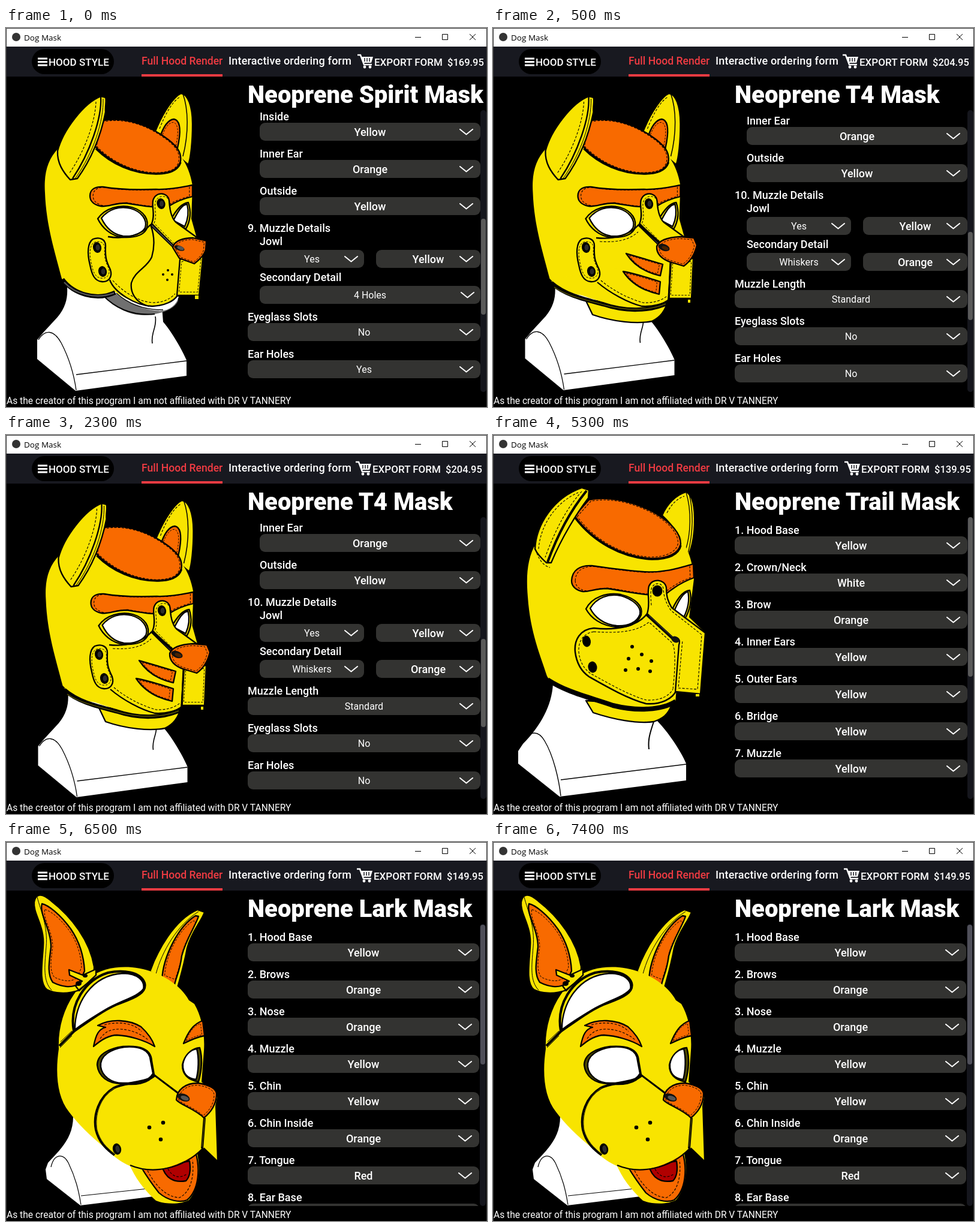
Animation of 802x632 px, one loop 8 s. Source, as an HTML page:

```html
<!DOCTYPE html>
<html lang="en">
<head>
<meta charset="utf-8">
<title>Hood order form</title>
<style>
  html, body { margin: 0; width: 100%; height: 100%; overflow: hidden; background: #000; }
  svg { display: block; width: 802px; height: 632px; }
  text { font: 500 18px Roboto, sans-serif; fill: #fff; }
  .title { font-weight: 800; font-size: 40px; }
  .value { text-anchor: middle; }
  .small { font-size: 16px; font-weight: 400; }
  .bar { font-size: 17px; }
  .line, .stitch, .chevron { fill: none; stroke: #000; stroke-width: 2; stroke-linejoin: round; }
  .chevron { stroke: #fff; stroke-linecap: round; }
  .stitch { stroke-width: 1.1; stroke-dasharray: 4 2.5; }
  .inset { transform-box: fill-box; transform-origin: center; }
</style>
</head>
<body>
<svg viewBox="0 0 802 632">
  <defs><clipPath id="list"><rect x="400" y="137" width="402" height="470"/></clipPath></defs>
  <rect width="802" height="632"/>
  <rect width="802" height="31" fill="#fff"/>
  <circle cx="17" cy="15" r="7" fill="#333"/>
  <text x="30" y="21" style="font:13.5px 'Open Sans',sans-serif;fill:#000">Dog Mask</text>
  <path d="M682 15.5h10M727.5 10.5h9v9h-9zM773 10l10 10m0-10l-10 10" fill="none" stroke="#000"/>
  <rect y="31" width="802" height="50" fill="#181920"/>
  <rect x="43" y="35" width="137" height="42" rx="21"/>
  <path d="M53 51h16M53 56.5h16M53 62h16" stroke="#fff" stroke-width="3"/>
  <text class="bar" x="71" y="63">HOOD STYLE</text>
  <text x="226" y="61" style="fill:#ef3b42;font-size:17.6px">Full Hood Render</text>
  <rect x="226" y="77" width="135" height="4" fill="#ef3b42"/>
  <text x="371" y="61" letter-spacing=".2">Interactive ordering form</text>
  <text x="1" y="627" style="font-size:15.6px;font-weight:400">As the creator of this program I am not affiliated with DR V TANNERY</text>
  <g id="stage"></g>
  <path d="M.5 632V.5h801V632" fill="none" stroke="#333"/>
</svg>
<script>
const YELLOW = '#f8e400', ORANGE = '#f86a00', WHITE = '#fff', GRAY = '#707070';

// Drawing helpers
const shape = (d, fill) => `<path d="${d}" fill="${fill}"/>`;
const line = (d, width = 2.3, color = '#000') =>
  `<path class="line" d="${d}" style="stroke:${color};stroke-width:${width}"/>`;
const stitch = d => `<path class="stitch" d="${d}"/>`;
const patch = (d, fill, inset) => shape(d, fill) + line(d) +
  (inset ? `<path class="stitch inset" d="${d}" transform="scale(${inset})"/>` : '');
const oval = (x, y, rx, ry = rx, fill = '#000', turn = 0) =>
  `<ellipse cx="${x}" cy="${y}" rx="${rx}" ry="${ry}" fill="${fill}" transform="rotate(${turn} ${x} ${y})"/>`;
const snap = (x, y) => oval(x, y, 7, 9, '#000', -12) + oval(x + 1, y, 3.5, 5, '#2c2c2c');
const holes = (r, ...points) => points.map(([x, y]) => oval(x, y, r)).join('');
const text = (x, y, str, cls = '') => `<text class="${cls}" x="${x}" y="${y}">${str}</text>`;

// Form helpers
function box(x, y, right, value, small, arrow = 34) {
  const middle = (x + right) / 2;
  return `<rect x="${x}" y="${y}" width="${right - x}" height="30" rx="9" fill="#333331"/>` +
    text(middle, y + (small ? 21 : 22), value, small ? 'value small' : 'value') +
    `<path class="chevron" d="M${right - arrow} ${y + 11}l10.5 8.5l10.5-8.5"/>`;
}
const field = (x, y, label, value, small, right = 791) =>
  text(x, y - 4, label) + box(x, y, right, value, small);
const halves = (y, label, a, b) => text(423, y - 8, label) +
  box(423, y, 597, a, true, 32) + box(617, y, 791, b);
const column = (right, ...rows) =>
  rows.map(([label, value], i) => field(403, 169 + 62 * i, `${i + 1}. ${label}`, value, false, right)).join('');

const header = (x, price) => `<g transform="translate(${x} 44)">
  <path d="M0 1h5l6 16h13" fill="none" stroke="#fff" stroke-width="2.5"/>
  <path d="M6 4h20l-3 10H10z" fill="#fff"/>
  <path d="M12 6v6M16 6v6M20 6v6" stroke="#181920" stroke-width="1.5"/>
  ${oval(12, 21, 2.4, 2.4, WHITE)}${oval(21, 21, 2.4, 2.4, WHITE)}</g>` +
  text(x + 28, 63, 'EXPORT FORM', 'bar') +
  `<text x="${x + 150}" y="63" style="font-size:16.5px">${price}</text>`;

const scrollbar = (x, top, bottom, color) =>
  `<rect x="${x}" y="137" width="10" height="470" rx="5" fill="#15161d"/>
   <rect x="${x + 1}" y="${top}" width="8" height="${bottom - top}" rx="4" fill="${color}"/>`;

// Parts common to the two pointed-ear hoods
const bust =
  shape('M102 432C103 450 100 465 86 482L62 508L52 520V552L116 605L301 580V554C293 535 275 505 262 490L258 440Z', WHITE) +
  line('M54 520C65 502 80 503 92 525C105 550 113 575 117 604M117 578L301 555', 1.3) +
  line('M249 481C252 500 241 508 244 526', 1.6);
const earsAndFace =
  patch('M249 172C262 140 280 114 292 109C303 110 311 130 311 160C311 190 308 217 304 228L280 208Z', YELLOW) +
  line('M295 110C304 135 305 175 295 214', 1.5) + stitch('M256 168C266 142 278 122 290 115') +
  patch('M256 184C262 165 270 153 280 152C291 154 291 172 288 190L285 205Z', ORANGE, .8) +
  shape('M88 200C68 220 63 245 65 275C67 330 82 375 93 418C120 446 155 452 182 440C200 452 222 463 244 464C265 463 280 455 286 446L290 380L318 350L309 318L311 263C307 240 300 225 291 214L160 156Z', YELLOW) +
  patch('M158 155C190 148 227 156 262 180C286 196 293 208 291 222C289 237 275 243 250 243C210 242 172 222 148 197Z', ORANGE, .96) +
  line('M150 201C176 227 212 243 250 243C272 243 286 238 291 224', 3.5) +
  patch('M140 280C140 268 150 264 162 265C190 270 220 270 250 269C275 270 295 265 311 262V281C298 284 284 289 270 298C240 300 220 295 200 292C180 292 170 299 158 297C147 295 140 289 140 280Z', ORANGE, .94) +
  patch('M86 205C95 170 130 125 158 114L166 116C168 122 165 130 166 140C159 175 145 215 119 251L107 253C95 240 85 225 86 205Z', YELLOW) +
  line('M158 115C160 150 140 208 111 251') + line('M162 118C163 155 146 208 116 250', 1) +
  stitch('M150 123C149 155 132 205 105 243') +
  patch('M153 318C165 300 190 294 210 299C230 305 240 320 234 336C228 346 214 350 195 349C175 347 160 333 153 318Z', YELLOW) +
  patch('M159 317C171 302 190 296 208 301C226 306 236 320 232 333C225 344 212 348 195 347C178 344 166 332 159 317Z', WHITE) +
  patch('M274 321C282 306 292 292 304 291C309 306 307 322 300 335Z', YELLOW) +
  patch('M279 321C286 308 293 294 302 294C305 306 304 318 298 331Z', WHITE) +
  patch('M243 326C249 312 243 300 245 288C249 272 270 273 272 288C273 305 276 320 286 326L322 352L281 365Z', YELLOW, .9) +
  line('M241 327L282 367', 5) + line('M243 329L282 367', 1.5, '#555') +
  snap(258.5, 293);
const cheekStrap =
  patch('M145 352C156 348 166 352 166 363C165 385 168 390 174 403C178 415 171 424 160 423C147 422 143 410 140 395C135 375 136 358 145 352Z', YELLOW, .84) +
  snap(152, 366) + snap(161, 406);

const roundMuzzle = bust +
  shape('M160 442C180 465 205 480 232 479C258 477 280 470 287 455L285 440Z', GRAY) +
  shape('M180 440C205 462 232 470 258 472C274 470 284 462 288 448Z', WHITE) +
  line('M162 446C185 470 215 480 248 477', 2) + line('M184 442C208 464 235 470 262 470', 1.5) +
  earsAndFace +
  line('M94 419C112 443 150 456 182 441', 7) + line('M97 424C115 444 150 453 180 442', 2.5, '#555') +
  line('M170 348C200 353 226 345 241 328C248 347 248 365 243 382C235 400 215 405 209 425C207 440 215 458 238 464M173 420C180 440 215 463 244 464C266 463 280 455 286 446') +
  stitch('M178 421C195 440 220 456 244 458C262 458 274 452 282 443') +
  cheekStrap +
  patch('M290 386L329 375L322 446H285Z', YELLOW, .84) + shape('M315 446h6v6h-6z', YELLOW) +
  patch('M278 366C280 355 295 350 312 350L334 355L333 370C330 380 322 387 314 393L289 384Z', ORANGE, .87) +
  oval(289, 367, 9, 4, '#111', 20) + oval(291, 367, 6, 3, '#555', 20) +
  holes(2, [262, 411], [270, 404], [277, 411], [269, 420]);

const whiskerMuzzle = `<g transform="translate(1.5 -1)">${bust}</g>` +
  patch('M155 455L166 478C200 490 240 494 265 489C280 482 288 470 291 455Z', YELLOW) +
  `<g transform="translate(1.5 0)">${earsAndFace}</g>` +
  shape('M97 422C130 442 150 446 185 458C220 469 260 470 291 456L296 380L276 372L250 395L140 410Z', YELLOW) +
  line('M97 425C120 445 150 452 185 461C220 473 262 473 292 458', 7) +
  line('M102 432C125 448 155 453 190 463C225 472 262 471 288 460', 1.5, '#5c5500') +
  line('M172 350C202 353 228 345 243 328M174 424C195 442 225 458 248 464C268 465 285 460 294 452') +
  stitch('M178 356C206 358 226 354 242 340M180 421C200 438 228 452 250 458C268 459 282 454 290 447') +
  `<g transform="translate(3 0)">${cheekStrap}</g>` +
  patch('M297 388L334 384L331 451H293Z', YELLOW, .84) + shape('M325 453h4v5h-4z', YELLOW) +
  line('M296 388L293 458', 3) +
  line('M244 328L282 362', 4) +
  patch('M273 364C277 354 292 349 312 348L335 350L340 362C336 380 328 390 318 397L298 391C281 386 272 376 273 364Z', ORANGE, .87) +
  oval(285, 366, 10, 5.5, '#111', 20) + oval(287, 367, 6, 3, '#4a2200', 20) +
  patch('M222 376L283 394L279 413C255 408 235 396 222 376Z', ORANGE, .82) +
  patch('M217 406C240 410 262 418 279 423L277 444C250 438 230 426 217 406Z', ORANGE, .82);

const flatMuzzle =
  shape('M100 415C98 455 75 490 50 515L42 527V548L111 603L322 576V548C315 530 292 495 275 478L240 440Z', WHITE) +
  line('M44 521C55 494 74 489 86 510C101 535 110 575 113 602M113 575L322 549', 1.4) +
  line('M268 478C262 496 258 508 260 524', 2) +
  patch('M155 443L167 463C200 474 240 482 268 478C283 473 292 466 297 452Z', YELLOW) +
  patch('M282 134C290 115 305 100 322 95C333 100 337 120 336 150C335 172 331 190 325 202C318 180 305 155 282 134Z', YELLOW) +
  line('M322 96C331 125 330 165 321 192M327 98C335 130 333 165 325 198', 1.3) + stitch('M290 130C298 115 307 106 319 102') +
  shape('M72 180C57 205 55 235 58 270C62 330 80 370 90 402L97 414C130 430 160 437 195 450C235 460 275 459 304 446L312 345L354 330L327 304L335 240C333 210 325 190 312 170L160 108L136 130Z', YELLOW) +
  line('M91 408C125 430 160 437 200 451C240 461 282 459 305 444', 8) +
  patch('M136 135L160 108C190 102 230 108 270 130C300 148 313 165 313 182C310 198 290 206 265 206C215 204 165 175 136 135Z', ORANGE, .95) +
  line('M137 138C167 178 215 205 265 207C291 207 309 200 313 184', 3.5) +
  patch('M70 190C72 150 100 105 148 88L160 92L159 105C140 130 115 170 97 213L89 213C80 205 73 197 70 190Z', YELLOW) +
  line('M156 93C130 125 108 165 91 212', 4) + stitch('M148 94C122 123 103 160 87 204M76 190C79 150 105 112 142 96M68 178C72 200 80 217 95 221') +
  patch('M131 243C132 225 145 217 165 218C195 222 220 226 250 228C285 230 310 222 334 215L335 238C315 245 300 255 285 268C250 268 220 260 190 256C170 256 160 262 150 261C138 259 131 252 131 243Z', ORANGE, .94) +
  patch('M155 290C165 270 190 262 213 266C237 272 251 285 247 300C241 315 225 322 205 320C180 318 163 305 155 290Z', YELLOW) +
  patch('M162 289C173 271 193 264 213 268C234 274 248 287 245 299C240 313 225 319 206 318C184 316 169 303 162 289Z', WHITE) +
  patch('M294 302C302 282 314 260 328 259C332 274 329 292 319 308Z', YELLOW) +
  patch('M299 302C305 285 315 264 325 261C328 275 325 290 318 304Z', WHITE) +
  line('M168 322C205 326 240 320 257 298M168 322C145 324 135 342 137 362C140 385 150 396 160 403C190 420 225 440 255 448C280 450 300 440 306 425', 2.5) +
  stitch('M168 328C150 331 142 344 143 362C145 380 153 391 163 398C193 414 226 434 256 442C278 443 293 436 300 424M168 328C210 331 240 328 260 312L298 346C305 352 304 390 300 424') +
  patch('M257 298C263 280 256 265 260 252C265 238 287 240 289 255C289 270 292 278 298 288L354 330L346 432L304 428L310 350C313 341 308 336 300 338Z', YELLOW) +
  stitch('M264 284C263 270 262 262 265 254C270 245 282 246 284 256C285 272 289 281 297 293L348 333L341 424L309 422L316 342') +
  line('M256 299L305 344', 5) + line('M260 301L300 338', 1, '#555') +
  shape('M338 432h6v4h-6z', YELLOW) + oval(304, 341, 7, 5, '#111', 25) +
  oval(274, 260, 8.5, 9.5) + oval(156, 344, 7, 9.5, '#000', -10) + oval(166, 387, 7.5, 9.5, '#000', -10) +
  holes(3, [232, 353], [248, 366], [264, 377], [226, 373], [242, 390], [221, 392], [262, 394]);

const openMouth =
  shape('M112 458C112 495 88 515 70 535L66 546L68 562L124 606L246 591L222 545Z', WHITE) +
  line('M75 542C80 520 95 518 104 535C116 560 121 580 125 605M125 590L246 577', 1.2) +
  patch('M240 216C252 182 280 130 319 113L331 117C326 132 309 150 302 177C297 205 290 228 286 243Z', YELLOW) +
  patch('M260 230C262 190 288 140 316 123L321 124C316 140 300 162 293 190C290 215 283 227 281 238Z', ORANGE, .85) +
  line('M250 220C260 182 286 138 321 116', 1) +
  shape('M205 536C215 560 230 580 250 598C265 604 290 605 305 597C322 577 325 545 318 515Z', YELLOW) +
  patch('M224 540L316 517C324 545 322 580 302 597C290 602 270 598 255 585C243 570 233 555 224 540Z', ORANGE) +
  stitch('M236 548C250 575 268 592 289 593C309 584 314 555 311 530') +
  patch('M260 540C265 560 280 569 300 565C307 558 308 545 306 532Z', '#b00000') +
  stitch('M270 545C278 560 290 561 301 554') +
  shape('M88 345C86 300 104 255 137 228C158 211 185 207 210 209C258 214 292 240 305 264L314 270C326 290 332 320 330 348L326 400L352 425L349 440L352 533L328 511C300 536 260 551 225 546C200 540 185 530 165 510C140 490 120 470 105 450C85 425 82 385 88 345Z', YELLOW) +
  line('M207 539C245 555 295 545 328 511') +
  line('M89 340L113 316C143 295 168 276 192 268C218 259 235 250 231 235C224 216 195 213 170 218C132 230 105 270 113 315', 4) +
  patch('M115 313C114 270 142 222 195 219C220 219 232 232 229 245C220 258 190 265 165 280C145 292 125 305 115 313Z', WHITE) +
  line('M91 333L110 315M90 343L110 323', 1) +
  patch('M47 100C50 85 60 85 75 98C110 125 140 165 147 208C148 220 140 230 122 247C100 255 80 252 68 246C55 235 60 205 62 175C65 140 45 120 47 100Z', YELLOW) +
  line('M52 92C58 115 70 140 67 175C64 210 62 232 76 247', 1) +
  patch('M60 103C70 105 90 120 108 145C125 170 130 195 131 215L122 235C110 246 90 240 78 234C68 220 72 200 75 175C75 145 55 120 60 103Z', ORANGE, .86) +
  patch('M105 213L128 222L150 212V222L122 248L116 240L127 232L106 222Z', YELLOW) +
  line('M126 244L151 221M118 249L147 226', 1.5) + oval(121, 236, 5, 4) + oval(132, 223, 4, 3) +
  patch('M146 341C150 320 155 312 166 309L153 306C175 294 205 296 225 308C238 320 245 332 248 341C230 330 205 323 185 322C170 322 155 333 146 341Z', ORANGE) +
  stitch('M157 328C165 316 175 312 190 312C210 313 227 321 237 330M164 305C190 298 214 303 226 316') +
  patch('M296 336C303 318 312 303 328 298L331 323C320 325 310 329 296 336Z', ORANGE, .75) +
  patch('M152 372C152 352 175 344 195 341C224 339 242 345 243 365L247 388C238 404 214 406 192 403C170 403 154 391 152 372Z', '#4c4700') +
  patch('M158 375C156 355 177 345 197 342C222 340 240 346 241 365L245 386C236 402 215 402 195 402C175 402 160 390 158 375Z', WHITE) +
  patch('M294 372C297 355 311 344 323 343C328 360 326 382 321 400C305 397 294 389 294 372Z', '#4c4700') +
  patch('M295 370C298 355 308 346 318 345C322 360 321 382 317 396C304 394 294 388 295 370Z', WHITE) +
  line('M248 389C235 402 200 400 180 410C155 425 145 455 150 480C155 500 166 511 181 522', 4) +
  line('M181 410C157 426 148 455 152 480C157 498 167 509 181 520', 1, '#6a6100') +
  line('M245 387L290 421', 3) +
  line('M331 460L327 511M329 511L352 533', 4) + line('M331 462L327 508', 1, '#6a6100') +
  patch('M284 430C285 412 300 402 320 402C340 405 352 412 351 422C350 440 340 452 330 460C315 445 290 438 284 430Z', ORANGE, .88) +
  oval(296, 426, 11, 6, '#111', 20) + oval(298, 427, 7, 3.5, '#555', 20) +
  holes(3.3, [239, 476], [262, 468], [258, 496]) + oval(185, 512, 7, 9.5, '#000', -12) + oval(186, 512, 3.5, 6, '#2c2c2c', -12);

const scenes = [
  { end: 500, name: 'Neoprene Spirit Mask', cart: 586, price: '$169.95', hood: roundMuzzle,
    bar: [791, 318, 478, '#5a5a5a'],
    form: field(423, 158, 'Inside', 'Yellow') + field(423, 220, 'Inner Ear', 'Orange') +
      field(423, 282, 'Outside', 'Yellow') + text(403, 340, '9. Muzzle Details') +
      halves(370, 'Jowl', 'Yes', 'Yellow') +
      text(423, 422, 'Secondary Detail') + box(423, 430, 791, '4 Holes', true, 32) +
      field(403, 492, 'Eyeglass Slots', 'No', true) + field(403, 554, 'Ear Holes', 'Yes', true) },
  { end: 3500, name: 'Neoprene T4 Mask', cart: 583, price: '$204.95', hood: whiskerMuzzle,
    bar: [791, 340, 487, '#5a5a5a'],
    form: field(423, 165, 'Inner Ear', 'Orange') + field(423, 227, 'Outside', 'Yellow') +
      text(403, 285, '10. Muzzle Details') + halves(315, 'Jowl', 'Yes', 'Yellow') +
      halves(375, 'Secondary Detail', 'Whiskers', 'Orange') +
      field(403, 437, 'Muzzle Length', 'Standard', true) +
      field(403, 499, 'Eyeglass Slots', 'No', true) + field(403, 561, 'Ear Holes', 'No', true) },
  { end: 6500, name: 'Neoprene Trail Mask', cart: 586, price: '$139.95', hood: flatMuzzle,
    bar: [791, 137, 403, '#5a5a5a'],
    form: column(791, ['Hood Base', 'Yellow'], ['Crown/Neck', 'White'], ['Brow', 'Orange'],
      ['Inner Ears', 'Yellow'], ['Outer Ears', 'Yellow'], ['Bridge', 'Yellow'], ['Muzzle', 'Yellow']) },
  { end: 8000, name: 'Neoprene Lark Mask', cart: 585, price: '$149.95', hood: openMouth,
    bar: [790, 138, 371, '#50505a'],
    form: column(789, ['Hood Base', 'Yellow'], ['Brows', 'Orange'], ['Nose', 'Orange'], ['Muzzle', 'Yellow'],
      ['Chin', 'Yellow'], ['Chin Inside', 'Orange'], ['Tongue', 'Red'], ['Ear Base', 'Yellow']) },
];

const stage = document.getElementById('stage');
stage.innerHTML = scenes.map(s => `<g>${s.hood}${header(s.cart, s.price)}${text(403, 125, s.name, 'title')}
  <g clip-path="url(#list)">${s.form}</g>${scrollbar(...s.bar)}</g>`).join('');

function draw() {
  const time = performance.now() % 8000;
  const current = scenes.findIndex(s => time < s.end);
  [...stage.children].forEach((g, i) => g.style.display = i === current ? '' : 'none');
  requestAnimationFrame(draw);
}
draw();
</script>
</body>
</html>
```
